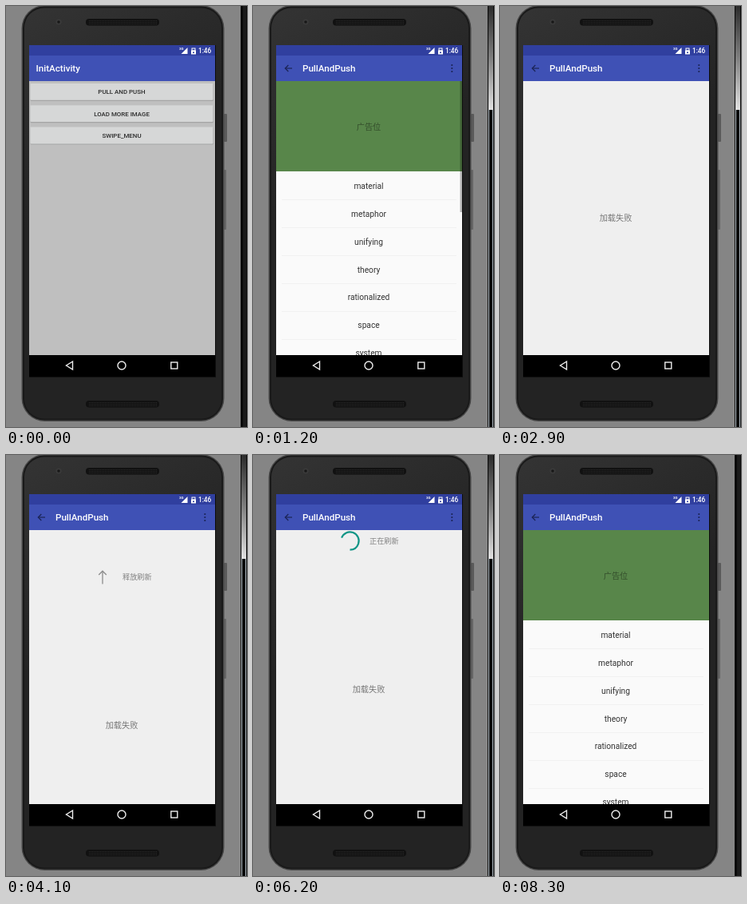
Recreate the animation shown at these times as an HTML page with a canvas. Size 302x527 px, loop 8.4 s.

```html
<!DOCTYPE html>
<html lang="en">
<head>
<meta charset="utf-8">
<title>Pull to refresh demo</title>
<style>
  html, body { margin: 0; width: 100%; height: 100%; overflow: hidden; background: #858585; }
  canvas { display: block; }
</style>
</head>
<body>
<canvas id="stage" width="302" height="527"></canvas>
<script>
const ctx = document.getElementById('stage').getContext('2d');
const LOOP = 8400, STEP = 100;
const LATIN = 'Roboto, sans-serif';
const CJK = '"Noto Sans CJK SC", "Noto Sans CJK", sans-serif';
const WORDS = ['material', 'metaphor', 'unifying', 'theory', 'rationalized', 'space', 'system'];
const MENU = ['Normal', 'OverScroll effect', 'LoadData Scrollable', 'Replace contentview',
  'Add error view', 'Change refresh'];

const PULL = [[3000, 0], [3900, 36], [4100, 73], [4200, 79], [4300, 79], [4400, 58],
  [4500, 38], [4600, 28], [7000, 28], [7100, 19], [7200, 10], [7300, 3], [7400, 0]];
const WINDOW_ALPHA = [[800, 0], [900, .3], [1000, .65], [1100, .9], [1200, 1]];
const WINDOW_SHIFT = [[900, 24], [1000, 10], [1100, 3], [1200, 0]];
const MENU_ALPHA = [[1500, 0], [1600, .55], [1700, 1], [2600, 1], [2900, 0]];
const BAR_ALPHA = [[1900, 1], [2200, 0], [7000, 0], [7100, 1], [7500, 1], [7700, 0]];

const clamp = x => Math.min(1, Math.max(0, x));
const smooth = x => { x = clamp(x); return x * x * (3 - 2 * x); };

// Piecewise linear value from [time, value] keys
function track(keys, t) {
  if (t <= keys[0][0]) return keys[0][1];
  for (let i = 1; i < keys.length; i++) {
    const [t0, a] = keys[i - 1], [t1, b] = keys[i];
    if (t <= t1) return a + (b - a) * (t - t0) / (t1 - t0);
  }
  return keys[keys.length - 1][1];
}

function rect(x, y, w, h, color) {
  ctx.fillStyle = color;
  ctx.fillRect(x, y, w, h);
}

function round(x, y, w, h, r, color) {
  ctx.fillStyle = color;
  ctx.beginPath();
  ctx.roundRect(x, y, w, h, r);
  ctx.fill();
}

function dot(x, y, r, color) {
  ctx.fillStyle = color;
  ctx.beginPath();
  ctx.arc(x, y, r, 0, 7);
  ctx.fill();
}

function line(points, color, width, close) {
  ctx.strokeStyle = color;
  ctx.lineWidth = width;
  ctx.beginPath();
  points.forEach(([x, y]) => ctx.lineTo(x, y));
  if (close) ctx.closePath();
  ctx.stroke();
}

function polygon(points, color) {
  ctx.fillStyle = color;
  ctx.beginPath();
  points.forEach(([x, y]) => ctx.lineTo(x, y));
  ctx.fill();
}

function gradient(x0, y0, x1, y1, ...colors) {
  const g = ctx.createLinearGradient(x0, y0, x1, y1);
  colors.forEach((c, i) => g.addColorStop(i / (colors.length - 1), c));
  return g;
}

// y is the baseline
function text(str, x, y, size, color, { weight = 400, align = 'left', family = LATIN } = {}) {
  ctx.font = `${weight} ${size}px ${family}`;
  ctx.textAlign = align;
  ctx.fillStyle = color;
  ctx.fillText(str, x, y);
}

function group(draw, alpha = 1) {
  ctx.save();
  ctx.globalAlpha *= alpha;
  draw();
  ctx.restore();
}

function clip(x, y, w, h) {
  ctx.beginPath();
  ctx.rect(x, y, w, h);
  ctx.clip();
}

function grille(y) {
  round(100, y, 92, 8.5, 4, '#111');
  for (let r = 0; r < 3; r++)
    for (let x = 104; x < 189; x += 2) rect(x, y + 2 + r * 2, 1, 1, '#2b2b2b');
}

function phone() {
  rect(0, 0, 302, 527, '#858585');
  round(273, 135, 4, 35, 1, '#5a5a5a');
  round(273, 205, 3, 75, 1, '#666');
  round(19.5, -1, 254, 521, 29, '#484848');
  round(21, .5, 251, 518, 27, '#191919');
  round(23, 2.5, 247, 514, 25, gradient(23, 0, 150, 200, '#343434', '#232323'));
  dot(66, 20, 3.6, '#3a3a3a');
  dot(66, 20, 1.8, '#171717');
  grille(16);
  grille(494);
}

function edgeStrip(lit) {
  rect(294, 0, 8, 527, '#080808');
  if (!lit) return rect(297, 0, 4, 527, '#1b1b1b');
  rect(295, 0, 6, 130, gradient(0, 0, 0, 130, '#2c2c2c', '#808080', '#e2e2e2'));
  rect(295, 130, 1, 397, '#b9c4cc');
  rect(300, 130, 1, 397, '#b9c4cc');
}

function statusBar() {
  rect(29, 49, 233, 13, '#303f9f');
  text('3G', 217, 55, 4.4, '#fff', { weight: 700 });
  polygon([[219.5, 60], [227.5, 60], [227.5, 52]], '#fff');
  rect(232, 55.5, 6, 5, '#fff');
  ctx.strokeStyle = '#fff';
  ctx.lineWidth = 1;
  ctx.strokeRect(233, 53, 4, 3);
  rect(234, 57.5, 2, 1.5, '#303f9f');
  text('1:46', 257.3, 59, 8.3, '#fff', { weight: 500, align: 'right' });
}

function toolbar(title, x) {
  statusBar();
  rect(29, 62, 233, 32, '#3f51b5');
  text(title, x, 82, 11.6, '#fff', { weight: 500 });
}

function navBar() {
  rect(29, 437, 234, 27.5, '#000');
  rect(262, 49, 1, 415, '#0c0c0c');
  line([[83.5, 445], [75.5, 450], [83.5, 455]], '#eee', 1.4, true);
  ctx.beginPath();
  ctx.arc(145, 450, 5, 0, 7);
  ctx.stroke();
  ctx.strokeRect(206.8, 446, 8, 8);
}

function startScreen(t) {
  rect(29, 94, 233, 343, '#bfbfbf');
  toolbar('InitActivity', 37.5);
  ['PULL AND PUSH', 'LOAD MORE IMAGE', 'SWIPE_MENU'].forEach((label, i) => {
    const y = 97 + i * 27.3;
    const pressed = i === 0 && t >= 300;
    round(30.5, y + .5, 229.5, 21.5, 1, '#a5a5a5');
    round(30.5, y, 229, 20.8, 1, pressed ? (t < 400 ? '#cacbcb' : '#b9baba') : '#d6d7d7');
    text(label, 145, y + 13.3, 7.9, '#2b2b2b', { weight: 500, align: 'center' });
  });
}

function listView(shift, barAlpha) {
  rect(29, 94 + shift, 233, 343, '#fafafa');
  rect(29, 94 + shift, 233, 113, '#58864a');
  text('广告位', 145, 155 + shift, 10.2, '#334d2b', { align: 'center', family: CJK });
  WORDS.forEach((word, i) => {
    const y = 208 + i * 34.85 + shift;
    text(word, 145, y + 21, 10.2, '#333', { align: 'center' });
    rect(36, Math.round(y + 34.4), 219, 1, '#f1f1f1');
  });
  group(() => rect(259.5, 94, 2.5, 164, 'rgba(0,0,0,.28)'), barAlpha);
}

function spinner(t, x, y) {
  const cycle = (t - 6200) / 1333 + .4;
  const turn = Math.floor(cycle), p = cycle - turn;
  const base = 200 + (t - 6200) * .2295 + 270 * turn;
  const tail = base + 270 * smooth(2 * p - 1);
  const head = base + 270 * smooth(2 * p) + 8;
  ctx.strokeStyle = '#109586';
  ctx.lineWidth = 2.2;
  ctx.beginPath();
  ctx.arc(x, y, 11.1, tail * Math.PI / 180, head * Math.PI / 180);
  ctx.stroke();
}

function pullHeader(t, shift) {
  const y = 80 + shift;
  const refreshing = t >= 4400, release = t >= 4000;
  if (refreshing) spinner(t, 121.5, y - .5);
  else group(() => {
    ctx.translate(121, y);
    if (!release) ctx.rotate(Math.PI);
    line([[0, 8.5], [0, -7.5]], '#8b8b8b', 1.3);
    line([[-4.8, -3], [0, -7.8], [4.8, -3]], '#8b8b8b', 1.3);
  });
  const label = refreshing ? '正在刷新' : release ? '释放刷新' : '下拉刷新';
  text(label, 146, y + 3.4, 9.15, '#808080', { family: CJK });
}

function menu(t, alpha) {
  group(() => {
    group(() => {
      ctx.shadowColor = 'rgba(0,0,0,.38)';
      ctx.shadowBlur = t < 1800 ? 6 : 8;
      ctx.shadowOffsetY = 2;
      round(149.5, 64, 109.5, 162, 1, '#fafafa');
    });
    if (t >= 2600) rect(149.5, 172.5, 109.5, 27.2, '#dedede');
    MENU.forEach((item, i) => text(item, 158, 80.2 + i * 27.25, 9.07, '#333'));
  }, alpha);
}

function demoScreen(t) {
  const shift = track(PULL, t);
  const failed = t >= 2700 && t < 7000;
  group(() => {
    clip(29, 94, 233, 343);
    rect(29, 94, 233, 343, '#efefef');
    if (failed) text('加载失败', 145, 269 + shift, 10.2, '#777', { align: 'center', family: CJK });
    else listView(shift, track(BAR_ALPHA, t));
    if (failed && shift > 0) pullHeader(t, shift);
  });
  toolbar('PullAndPush', 62);
  line([[49, 78], [40.5, 78]], '#1b2455', 1.2);
  line([[44.3, 74], [40.3, 78], [44.3, 82]], '#1b2455', 1.2);
  [74, 78, 82].forEach(y => dot(249.3, y, 1.1, '#1b2455'));
  const alpha = track(MENU_ALPHA, t);
  if (alpha > 0) menu(t, alpha);
}

function draw(t) {
  phone();
  edgeStrip(t >= 300 && t < 8300);
  group(() => {
    clip(29, 49, 233, 388);
    const alpha = track(WINDOW_ALPHA, t);
    if (alpha < 1) startScreen(t);
    if (alpha > 0) group(() => {
      ctx.translate(0, track(WINDOW_SHIFT, t));
      demoScreen(t);
    }, alpha);
  });
  navBar();
}

function tick() {
  const t = performance.now() % LOOP;
  draw(Math.floor(t / STEP) * STEP);
  requestAnimationFrame(tick);
}
tick();
</script>
</body>
</html>
```
